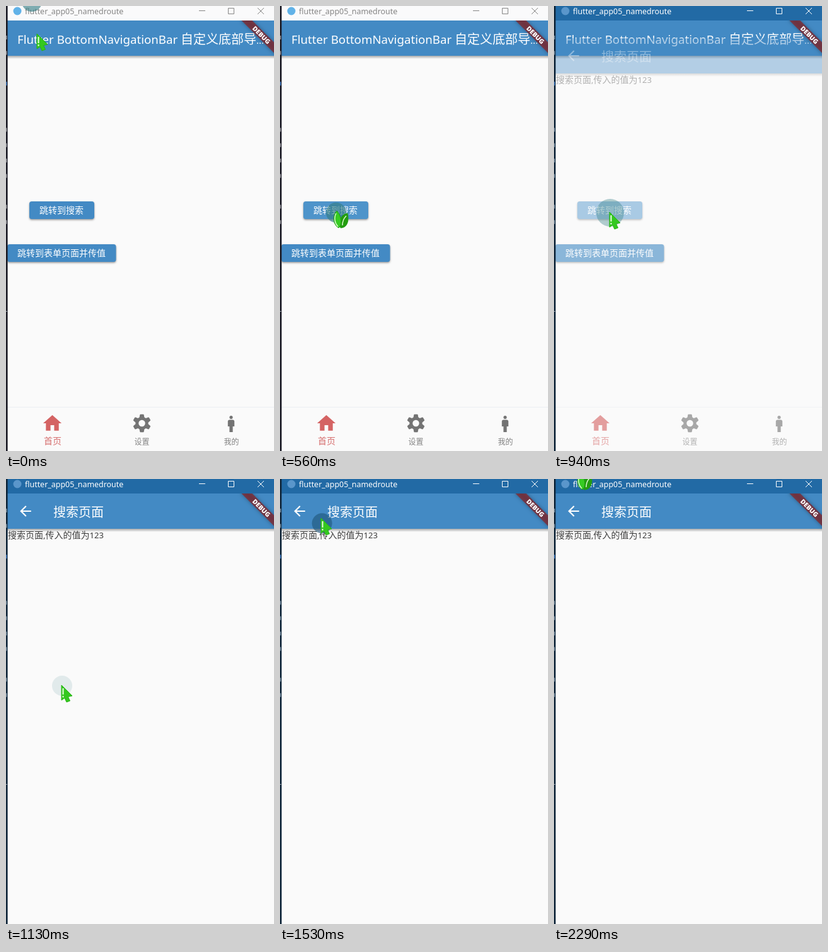
An HTML page with a canvas that plays this animation: 425x706 px, repeating every 2.46 s.

```html
<!DOCTYPE html>
<html lang="zh-CN">
<head>
<meta charset="utf-8">
<style>
html, body { margin: 0; width: 100%; height: 100%; overflow: hidden; background: #fafafa; }
canvas { display: block; }
</style>
</head>
<body>
<canvas id="stage" width="425" height="706"></canvas>
<script>
const g = document.getElementById('stage').getContext('2d');
const LOOP = 2460, BLUE = '#438ac4', HOVER = '#4e94ca', PAPER = '#fafafa';

// The screen is sampled about five times a second; each sample holds.
const samples = [0, 170, 340, 560, 750, 940, 1130, 1330, 1530, 1720, 1910, 2100, 2290];
const FOCUS = 750, SLIDE = 940, ARRIVED = 1130;

// Pointer stops: time, x, y
const stops = [[0, 49, 44], [170, 90, 371], [340, 88, 323], [560, 88, 327], [ARRIVED, 88, 327], [1530, 65, 62], [2290, 40, -8]];

const homeIcon = new Path2D('M10 20v-6h4v6h5v-8h3L12 3 2 12h3v8z');
const backIcon = new Path2D('M20 11H7.8l5.6-5.6L12 4l-8 8 8 8 1.4-1.4L7.8 13H20z');
const personIcon = new Path2D('M14 7h-4c-1.1 0-2 .9-2 2v6h2v7h4v-7h2V9c0-1.1-.9-2-2-2zM14 4a2 2 0 1 1-4 0a2 2 0 1 1 4 0z');
const gearIcon = makeGear();
const arrow = new Path2D('M0 0V24L5 20.5 8 27 13.5 25 10.5 18.5 17 17Z');
const leafLeft = new Path2D('M6 0C-1 8 0 22 9 27C15 23 14 8 6 0Z');
const leafRight = new Path2D('M23 4C13 5 9 16 12 27C22 27 26 17 23 4Z');
const leafShine = new Path2D('M5 4C1 11 3 20 8 25M21 8C17 12 15 17 15 23');

const progress = (t, from, to) => Math.min(1, Math.max(0, (t - from) / (to - from)));
const mix = (a, b, p) => a + (b - a) * p;

function pathAt(t) {
  const i = stops.findLastIndex(s => s[0] <= t);
  const [t0, x0, y0] = stops[i], [t1, x1, y1] = stops[i + 1] || [LOOP, x0, y0];
  const p = 1 - (1 - progress(t, t0, t1)) ** 1.2;
  return [mix(x0, x1, p), mix(y0, y1, p)];
}

function makeGear() {
  const path = new Path2D();
  const profile = [[-.39, 7], [-.23, 9.5], [-.17, 10], [.17, 10], [.23, 9.5], [.39, 7]];
  for (let i = 0; i < 6; i++) {
    const a = i * Math.PI / 3;
    for (const [da, r] of profile) path.lineTo(12 + r * Math.sin(a + da), 12 - r * Math.cos(a + da));
  }
  path.closePath();
  path.moveTo(15.6, 12);
  path.arc(12, 12, 3.6, 0, Math.PI * 2);
  return path;
}

function rect(x, y, w, h, color) {
  g.fillStyle = color;
  g.fillRect(x, y, w, h);
}

function disc(x, y, r, color) {
  g.fillStyle = color;
  g.beginPath();
  g.arc(x, y, r, 0, Math.PI * 2);
  g.fill();
}

function pill(x, y, w, color) {
  g.fillStyle = color;
  g.beginPath();
  g.roundRect(x, y, w, 28, 4);
  g.fill();
}

function shape(path, fill, stroke) {
  g.fillStyle = fill;
  g.strokeStyle = stroke;
  g.fill(path);
  g.stroke(path);
}

function icon(path, cx, cy, scale, color) {
  g.save();
  g.translate(cx - 12 * scale, cy - 12 * scale);
  g.scale(scale, scale);
  g.fillStyle = color;
  g.fill(path, 'evenodd');
  g.restore();
}

// Latin runs are set a little smaller than the Chinese ones.
function label(text, x, y, size, color) {
  g.fillStyle = color;
  for (const run of text.match(/[\x20-\x7e]+|[^\x20-\x7e]+/g)) {
    const latin = run.charCodeAt(0) < 127;
    g.font = latin ? `${size * .935}px "Noto Sans", sans-serif`
                   : `${size}px "Noto Sans CJK SC", "Noto Sans CJK", sans-serif`;
    g.fillText(run, x, y);
    x += g.measureText(run).width;
  }
}

function shadow(color, blur, dy) {
  g.shadowColor = color;
  g.shadowBlur = blur;
  g.shadowOffsetY = dy;
}

// Bar, paper and shadow do not overlap, so a page can be faded as a whole.
function page(y) {
  rect(2, y, 423, 56, BLUE);
  rect(2, y + 56, 423, 706, PAPER);
  const fade = g.createLinearGradient(0, y + 56, 0, y + 61);
  fade.addColorStop(0, 'rgba(0,0,0,.32)');
  fade.addColorStop(1, 'rgba(0,0,0,0)');
  rect(2, y + 56, 423, 5, fade);
}

function button(text, x, y, w, color) {
  g.save();
  shadow('rgba(0,0,0,.4)', 3, 1.5);
  pill(x, y, w, color);
  g.restore();
  label(text, x + 16, y + 19, 14, '#fff');
}

function homePage(t) {
  page(23);
  label('Flutter BottomNavigationBar 自定义底部导', 18, 60, 20, '#fff');
  label('...', 397, 60, 16, '#fff');

  const onFirst = t >= 340, onSecond = t >= 170 && !onFirst;
  button('跳转到搜索', 37, 310, 103, onFirst ? HOVER : BLUE);
  button('跳转到表单页面并传值', 2, 378, 172.5, onSecond ? HOVER : BLUE);
  if (t >= SLIDE) pill(37, 310, 103, 'rgba(255,255,255,.22)');
  else if (t >= FOCUS) disc(89, 328, 19, 'rgba(190,220,240,.35)');

  rect(2, 636, 423, 1, '#ebeef2');
  icon(homeIcon, 73.5, 662, 1.458, '#d46363');
  icon(gearIcon, 215.5, 662, 1.458, '#747474');
  icon(personIcon, 357, 663, 1.3, '#747474');
  label('首页', 60, 694.5, 14, '#d66f6f');
  label('设置', 203.5, 695.5, 12, '#828282');
  label('我的', 345.5, 695.5, 12, '#828282');
}

function searchPage(dy, alpha) {
  g.save();
  g.globalAlpha = alpha;
  page(23 + dy);
  icon(backIcon, 31, 51 + dy, 1.1, '#fff');
  label('搜索页面', 75, 60 + dy, 20, '#fff');
  label('搜索页面,传入的值为123', 3, 94 + dy, 14, '#3c3c3c');
  g.restore();
}

function debugBanner() {
  g.save();
  g.translate(429, 22);
  g.rotate(Math.PI / 4);
  g.save();
  shadow('rgba(0,0,0,.5)', 6, 0);
  rect(-40, 28, 80, 12, 'rgba(145,28,28,.66)');
  g.restore();
  g.font = '900 10.2px "Open Sans", sans-serif';
  g.textAlign = 'center';
  g.fillStyle = '#fff';
  g.fillText('DEBUG', 0, 37.7);
  g.restore();
}

function titleBar(active) {
  const ink = active ? '#fff' : '#858585';
  rect(2, 0, 423, 23, active ? '#226aa5' : '#fafafb');
  disc(18, 8, 6.5, active ? '#5a96cb' : '#61b2e8');
  label('flutter_app05_namedroute', 30, 13, 13.3, ink);
  g.strokeStyle = ink;
  g.lineWidth = 1;
  g.stroke(new Path2D('M306 7.5H316M352.5 3.5h9v9h-9zM399 3l10 10M409 3l-10 10'));
}

// Sliver of the code editor behind the window, one mark per line of code.
function editorEdge(active) {
  rect(0, 0, 2.6, 706, active ? '#10263a' : '#1c1c26');
  const ink = active ? '#71879a' : '#8b8b92';
  for (let line = 0; line < 13; line++) {
    if ([2, 4, 5, 10].includes(line)) continue;
    rect(0, 47 + line * 24.4, 1.5, 6, line === 3 ? '#3f78c0' : ink);
  }
  rect(0, 484, 2, 1, '#9aa4ad');
}

// The halo trails the pointer, swells and fades on a click, and dies out at the end.
function halo(t) {
  const [x, y] = pathAt((t - 20 + LOOP) % LOOP);
  const click = t <= ARRIVED ? progress(t, FOCUS, ARRIVED) : 0;
  const alpha = t <= ARRIVED ? mix(.62, .12, click) : mix(.6, 0, progress(t, 1530, 2290));
  const tint = t > ARRIVED ? '30,85,120' : '50,125,130';
  disc(x + 1, y + 1, 16 + 6 * Math.sin(Math.PI * click), `rgba(${tint},${alpha})`);
}

function pointer(t) {
  const [x, y] = pathAt(t);
  g.save();
  g.translate(x, y);
  g.lineWidth = 1;
  g.lineJoin = 'round';
  if ((t >= 170 && t < SLIDE) || t >= 2290) {
    g.translate(-4, -2);
    shape(leafRight, '#249d10', '#1f9c12');
    shape(leafLeft, '#36cc22', '#1f9c12');
    g.strokeStyle = '#d9f8cf';
    g.lineWidth = 1.5;
    g.stroke(leafShine);
  } else {
    shape(arrow, '#34c81f', '#2ab318');
    rect(1.5, 5, 2, 10, '#e9ffe2');
    rect(1.5, 17, 2, 2.5, '#e9ffe2');
  }
  g.restore();
}

function draw(t) {
  if (t < ARRIVED) homePage(t);
  if (t >= ARRIVED) searchPage(0, 1);
  else if (t >= SLIDE) searchPage(28, .39);
  debugBanner();
  titleBar(t >= FOCUS);
  editorEdge(t >= FOCUS);
  halo(t);
  pointer(t);
}

function tick() {
  const now = performance.now() % LOOP;
  draw(samples.findLast(s => s <= now));
  requestAnimationFrame(tick);
}
tick();
</script>
</body>
</html>
```
